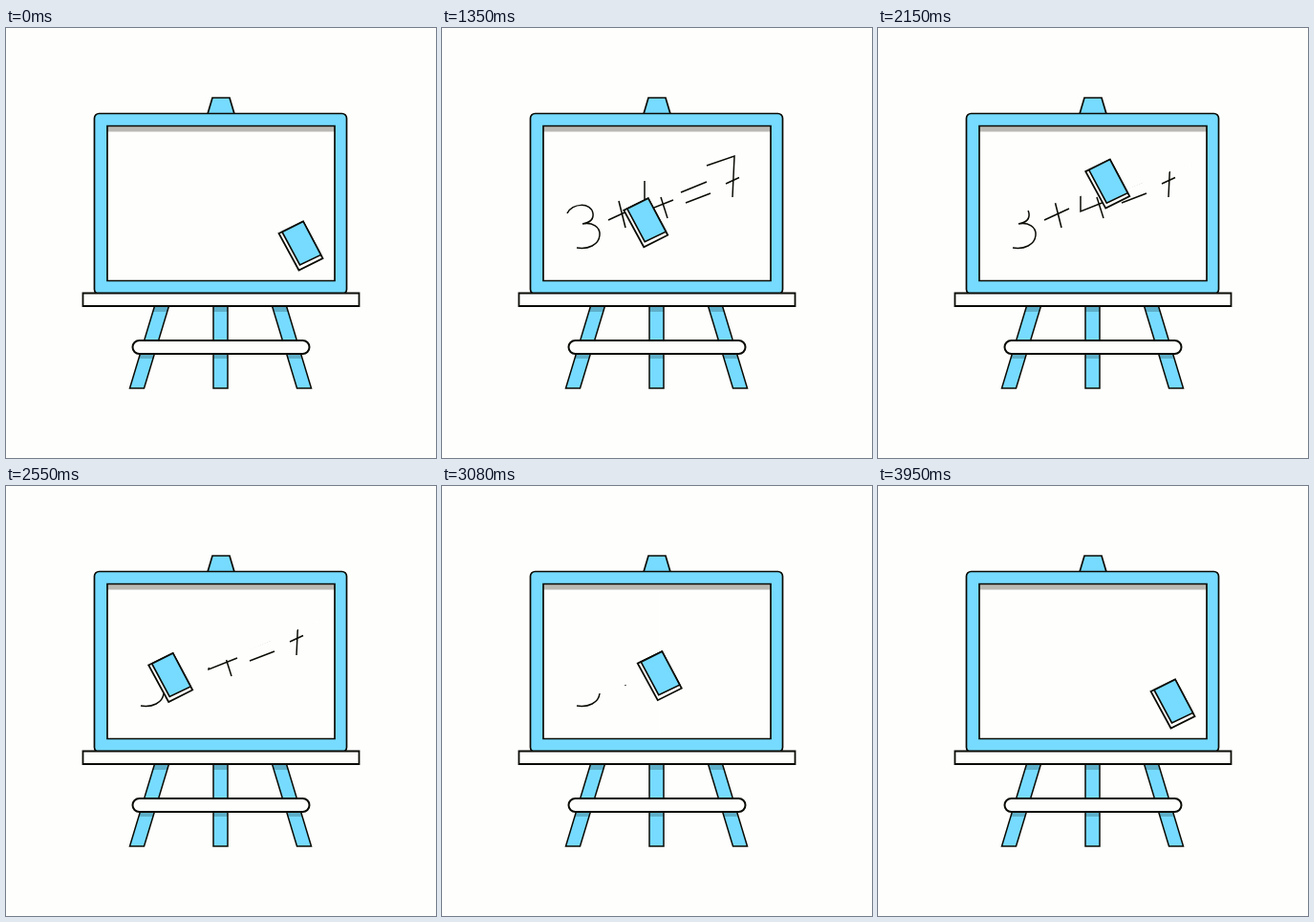
An HTML page with a canvas that plays this animation: 450 px wide and 450 px high, repeating every 3.99 s.

```html
<!DOCTYPE html>
<html lang="en">
<head>
<meta charset="utf-8">
<title>Whiteboard</title>
<style>
html, body { margin: 0; width: 100%; height: 100%; overflow: hidden; background: #fefefd; }
canvas { display: block; width: 450px; height: 450px; }
</style>
</head>
<body>
<canvas id="stage" width="450" height="450"></canvas>
<script>
const ctx = document.getElementById('stage').getContext('2d');
const LOOP = 3990, INK = '#0b0b04', PAPER = '#fefefd', BLUE = '#76dbff', SHADE = '#5eafc9', GREY = '#bab8b2';
const LEFT = 107, RIGHT = 343, TOP = 104, BOTTOM = 262;

// The sum 3 + 4 = 7, one subpath per pen stroke
const sum = 'M131 194C136 183 156 182 158 194C159 201 153 204 147 205C157 203 166 208 165 217C164 227 153 232 141 230' +
  'M174 201l26 -12M185 181l7 28M212 160v32l30 -12M229 177l7 22M250 172l27 -11M255 183l26 -10M277 144l29 -10l-2 43M297 163l14 -6.5';
const PEN_START = 30, PEN_END = 1010, LIFT = 10;
let penLength = -LIFT;
const strokes = sum.split('M').slice(1).map(part => {
  const d = 'M' + part;
  const el = document.createElementNS('http://www.w3.org/2000/svg', 'path');
  el.setAttribute('d', d);
  const start = penLength + LIFT, len = el.getTotalLength();
  penLength = start + len;
  return { path: new Path2D(d), start, len };
});

// Lower edge of what each wipe clears, left to right
const tail = [[LEFT, 227], [165, 217], [192, 208]];
const wipes = [
  [[LEFT, 205], [RIGHT, 139.5]],
  [...tail, [212, 190], [RIGHT, 134]],
  [...tail, [RIGHT, 208]],
  [[LEFT, BOTTOM], [RIGHT, BOTTOM]]
];

// The eraser zigzags down between left and right, from rest (0) to rest (6)
const stopTime = i => 1150 + 388 * Math.min(i, 2) + 460 * Math.max(i - 2, 0);
function stopPoint(i) {
  if (i % 6 === 0) return [308.5, 228];
  return i % 2 ? [136, 170.5 + 13.5 * i] : [332, 88 + 16.5 * i];
}

const clamp = v => Math.min(1, Math.max(0, v));
const ease = u => u < 0.5 ? 4 * u ** 3 : 1 - 4 * (1 - u) ** 3;

function eraserAt(t) {
  let i = 0;
  while (i < 5 && t >= stopTime(i + 1)) i++;
  const [x0, y0] = stopPoint(i), [x1, y1] = stopPoint(i + 1);
  const s = ease(clamp((t - stopTime(i)) / (stopTime(i + 1) - stopTime(i))));
  return [x0 + (x1 - x0) * s, y0 + (y1 - y0) * s];
}

function paint(fill, width) {
  if (fill) { ctx.fillStyle = fill; ctx.fill(); }
  if (width) { ctx.lineWidth = width; ctx.strokeStyle = INK; ctx.stroke(); }
}

function poly(points, fill, width) {
  ctx.beginPath();
  points.forEach(p => ctx.lineTo(...p));
  ctx.closePath();
  paint(fill, width);
}

function box(x, y, w, h, r, fill, width) {
  ctx.beginPath();
  ctx.roundRect(x, y, w, h, r);
  paint(fill, width);
}

function leg(side) {
  const top = 217 + 61.5 * side, foot = 217 + 87.5 * side;
  const shape = [[top, 291], [top + 15, 291], [foot + 15, 377], [foot, 377]];
  poly(shape, BLUE);
  ctx.save();
  ctx.clip();
  box(120, 291, 210, 6, 0, SHADE);
  box(120, 341, 210, 5, 0, SHADE);
  ctx.restore();
  poly(shape, null, 1.5);
}

function easel() {
  [-1, 0, 1].forEach(leg);
  box(132.5, 327, 185, 14, 7, PAPER, 2);
  poly([[216, 73], [234, 73], [239, 90], [211, 90]], BLUE, 1.7);
  box(92.5, 89.5, 264, 189, 5, BLUE, 1.7);
  box(106, 102.5, 238, 162, 0, PAPER);
}

function boardEdge() {
  box(106, 103, 238, 5.5, 0, GREY);
  box(106, 102.5, 238, 162, 0, null, 1.7);
  box(80.5, 277.5, 289, 13.5, 0, PAPER, 1.8);
}

function writing(t) {
  const drawn = penLength * clamp((t - PEN_START) / (PEN_END - PEN_START));
  ctx.lineWidth = 1.5;
  ctx.strokeStyle = INK;
  for (const { path, start, len } of strokes) {
    if (drawn <= start) break;
    ctx.setLineDash([Math.min(len, drawn - start), len + 9]);
    ctx.stroke(path);
  }
  ctx.setLineDash([]);
}

function wipe(t, x) {
  wipes.forEach((edge, i) => {
    if (t < stopTime(i + 1)) return;
    const done = t >= stopTime(i + 2), rightward = i % 2 === 0;
    const from = done || rightward ? LEFT : x, to = done || !rightward ? RIGHT : x;
    ctx.save();
    ctx.beginPath();
    ctx.rect(from, TOP, to - from, BOTTOM - TOP);
    ctx.clip();
    poly([[LEFT, TOP], ...edge, [RIGHT, TOP]], PAPER);
    ctx.restore();
  });
}

function eraser(x, y) {
  ctx.save();
  ctx.translate(x, y);
  poly([[-23, -13], [2.5, -25.5], [23, 13], [-2, 25.5]], PAPER, 1.8);
  poly([[-19.5, -14.5], [2.5, -25.5], [21, 9.5], [-1, 20]], BLUE, 1.6);
  ctx.restore();
}

function draw(t) {
  const [x, y] = eraserAt(t);
  ctx.fillStyle = PAPER;
  ctx.fillRect(0, 0, 450, 450);
  easel();
  writing(t);
  wipe(t, x);
  boardEdge();
  eraser(x, y);
}

const begin = performance.now();
function tick() {
  draw((performance.now() - begin) % LOOP);
  requestAnimationFrame(tick);
}
tick();
</script>
</body>
</html>
```
